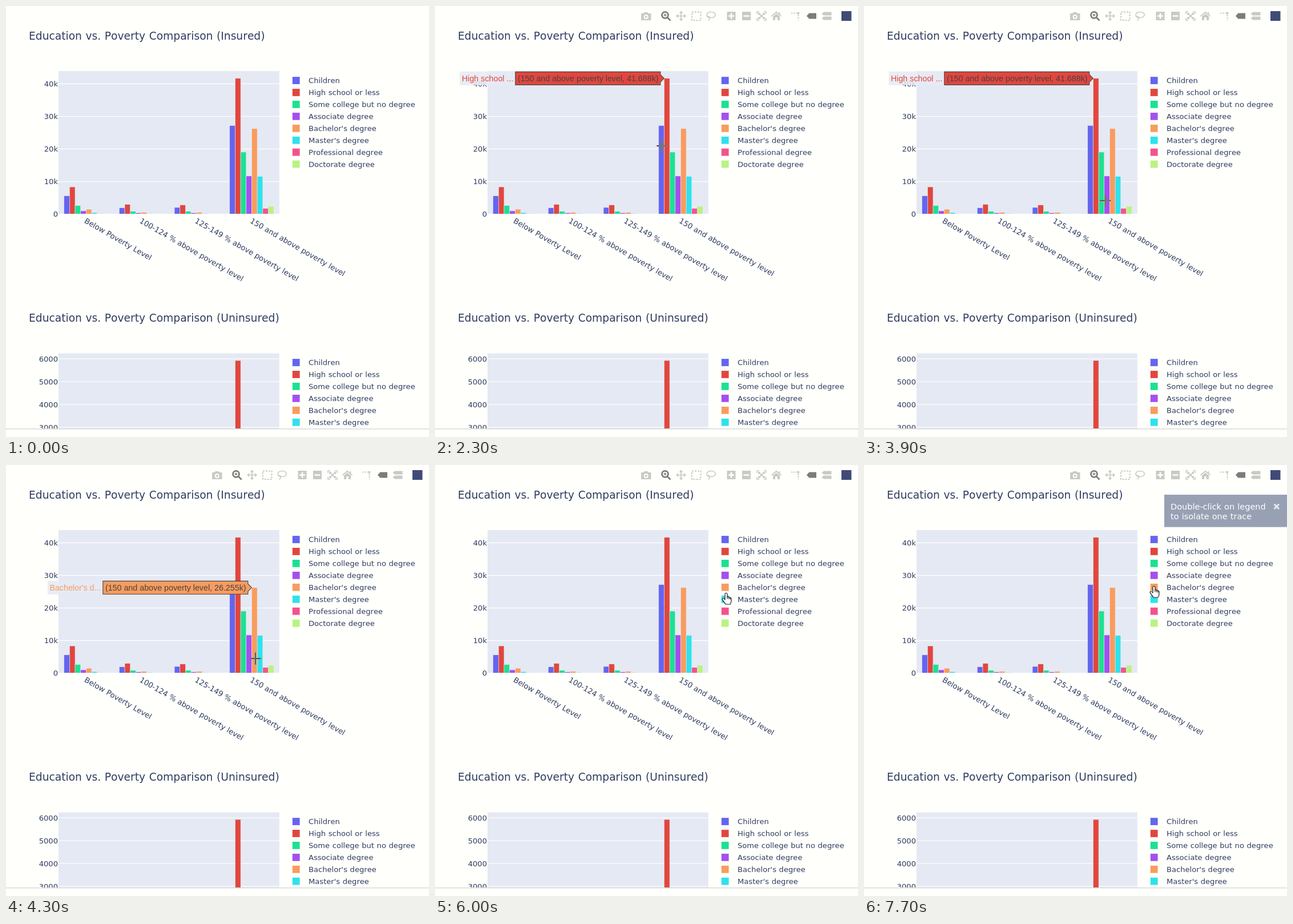
Write an HTML page with a canvas that moves like this. It is 741 px wide and 755 px high and loops after 8000 ms.

```html
<!DOCTYPE html>
<html lang="en">
<head>
<meta charset="utf-8">
<title>Education vs. Poverty Comparison</title>
<style>
  html, body { margin: 0; width: 100%; height: 100%; overflow: hidden; background: #fffffc; }
  canvas { display: block; }
</style>
</head>
<body>
<canvas id="stage" width="741" height="755"></canvas>
<script>
const ctx = document.getElementById('stage').getContext('2d');
const LOOP = 8000, STEP = 100;
const PAGE = '#fffffc', PLOT = '#e5e9f3', INK = '#2f3d60';
const SANS = '"DejaVu Sans", Verdana, sans-serif';
const ARIAL = '"Liberation Sans", Arial, sans-serif';
const SMALL = 13.1;

const traces = [
  { name: 'Children', color: '#6465f0', values: [5600, 1950, 2050, 27209] },
  { name: 'High school or less', color: '#e1463e', values: [8350, 3000, 2800, 41688] },
  { name: 'Some college but no degree', color: '#1ae292', values: [2650, 850, 850, 19050] },
  { name: 'Associate degree', color: '#a350ef', values: [1000, 400, 400, 11700] },
  { name: "Bachelor's degree", color: '#f89c5e', values: [1500, 550, 550, 26255] },
  { name: "Master's degree", color: '#2ee2ec', values: [450, 200, 200, 11600] },
  { name: 'Professional degree', color: '#f4528c', values: [130, 50, 50, 1750] },
  { name: 'Doctorate degree', color: '#b9f382', values: [90, 40, 40, 2400] }
];
const groups = ['Below Poverty Level', '100-124 % above poverty level',
  '125-149 % above poverty level', '150 and above poverty level'];

const LEFT = 92, RIGHT = 478.8, TOP = 114, ZERO = 364.6;
const GROUP = (RIGHT - LEFT) / 4;
const HIDDEN = 5, HIDE_AT = 6500, SHOW_AT = 7400;

// time, x, y of the pointer
const path = [
  [100, 424, 44], [900, 404, 56], [1200, 404, 56], [1500, 404, 66], [1900, 404, 150],
  [2300, 398, 245], [2800, 398, 300], [3200, 398, 343], [3600, 398, 343],
  [4000, 431, 340], [4300, 437, 339], [4600, 437, 339], [4700, 407, 310],
  [4900, 406, 270], [5400, 491, 244], [5800, 510, 226], [6000, 510, 224],
  [7300, 510, 225], [7600, 508, 212]
];
// time, hovered trace (-1 for none)
const hovers = [[0, -1], [1900, 1], [2900, 0], [3800, 1], [4000, 4], [4700, 1], [5000, 4], [5100, -1]];

const clamp = v => Math.max(0, Math.min(1, v));

function rect(x, y, w, h, color) {
  ctx.fillStyle = color;
  ctx.fillRect(x, y, w, h);
}

function text(str, x, y, size, color = INK, align = 'left', family = SANS) {
  ctx.font = `${size}px ${family}`;
  ctx.fontKerning = 'none';
  ctx.wordSpacing = family === SANS ? `${size * 0.034}px` : '0px';
  ctx.textAlign = align;
  ctx.fillStyle = color;
  ctx.fillText(str, x, y);
}

function bar(x, y, w, h, color) {
  rect(x, y, w, h, color);
  ctx.strokeStyle = PLOT;
  ctx.lineWidth = 0.6;
  ctx.strokeRect(x, y, w, h);
}

function gridLine(y, label) {
  rect(LEFT, y - 0.6, RIGHT - LEFT, 1.2, '#fff');
  text(label, 91, y + 4.8, SMALL, INK, 'right');
}

function legend(y, hidden) {
  traces.forEach((tr, i) => {
    const row = y + i * 20.94;
    ctx.globalAlpha = i === hidden ? 0.5 : 1;
    rect(501.8, row - 6.4, 12.8, 12.8, tr.color);
    text(tr.name, 530, row + 4.7, SMALL);
  });
  ctx.globalAlpha = 1;
}

function insuredChart(hidden) {
  text('Education vs. Poverty Comparison (Insured)', 40, 59.3, 18.68);
  rect(LEFT, TOP, RIGHT - LEFT, ZERO - TOP, PLOT);
  for (let k = 0; k < 5; k++) gridLine(ZERO - k * 57.05, k ? k * 10 + 'k' : '0');

  const shown = traces.filter((tr, i) => i !== hidden);
  const w = GROUP * 0.8 / shown.length;
  groups.forEach((name, g) => {
    const x0 = LEFT + GROUP * (g + 0.1);
    shown.forEach((tr, i) => {
      const h = tr.values[g] * 0.005705;
      bar(x0 + i * w, ZERO - h, w, h, tr.color);
    });
    ctx.save();
    ctx.translate(LEFT + GROUP * (g + 0.5) - 4, 379);
    ctx.rotate(Math.PI / 6);
    text(name, 0, 0, SMALL);
    ctx.restore();
  });
  rect(LEFT, ZERO - 0.6, RIGHT - LEFT, 1.4, '#fff');
  legend(130.5, hidden);
}

function uninsuredChart() {
  text('Education vs. Poverty Comparison (Uninsured)', 40, 552.8, 18.68);
  rect(LEFT, 608.5, RIGHT - LEFT, 140, PLOT);
  for (let k = 6; k > 2; k--) gridLine(618 + (6 - k) * 40, k * 1000);
  bar(LEFT + GROUP * 3.2, 621, GROUP * 0.1, 140, traces[1].color);
  legend(624.5, -1);
}

function icon(d, active) {
  ctx.fillStyle = active ? '#7c7c7c' : '#c9c9c7';
  ctx.fill(new Path2D(d), 'evenodd');
}

function iconLine(d, width, active, dash = []) {
  ctx.strokeStyle = active ? '#7c7c7c' : '#c9c9c7';
  ctx.lineWidth = width;
  ctx.setLineDash(dash);
  ctx.stroke(new Path2D(d));
  ctx.setLineDash([]);
}

function modebar(alpha) {
  ctx.globalAlpha = alpha;
  // camera
  icon('M361 13H365L366.5 11H372.5L374 13H378.5V25H361ZM365.7 19a4 4 0 1 0 8 0a4 4 0 1 0-8 0Z');
  icon('M367.6 19a2.1 2.1 0 1 0 4.2 0a2.1 2.1 0 1 0-4.2 0Z');
  // zoom
  iconLine('M397.5 15.8a5.5 5.5 0 1 0 11 0a5.5 5.5 0 1 0-11 0M407.5 20.5L412.5 25.5', 2.8, true);
  iconLine('M400.5 15.8H405.5M403 13.3V18.3', 1.4, true);
  // pan
  iconLine('M424 17.5H438M431 10.5V24.5', 1.7);
  icon('M422 17.5l4-3.5v7ZM440 17.5l-4-3.5v7ZM431 8.5l-3.5 4h7ZM431 26.5l-3.5-4h7Z');
  // box and lasso select
  iconLine('M450 10.5H465.5V25H450Z', 2, false, [3, 2]);
  iconLine('M478 20C474 15 477 10.5 484 10.5C494 10.5 493.5 20.5 483 20.5C478 20.5 477.5 18 480 18.5C483 20 480.5 23 479 25.5', 1.7);
  // zoom in, zoom out
  icon('M511.5 10H526.5V25H511.5ZM517.7 12.5V16.2H514V18.8H517.7V22.5H520.3V18.8H524V16.2H520.3V12.5Z');
  icon('M538 10H553V25H538ZM540.5 16.2V18.8H550.5V16.2Z');
  // autoscale
  iconLine('M564 14V10H568M576 10H580V14M580 21V25H576M568 25H564V21', 1.6);
  iconLine('M567 13L577 22M577 13L567 22', 1.9);
  icon('M566 12h4.5l-4.5 4.5ZM578 12h-4.5l4.5 4.5ZM566 23h4.5l-4.5-4.5ZM578 23h-4.5l4.5-4.5Z');
  // home
  icon('M598 9.5L602.5 13.3V11H604.5V15L607 17.3L606 18.7L598 12L590 18.7L589 17.3ZM598 13.5L604 18.5V25H600V20H596V25H592V18.5Z');
  // spike lines
  iconLine('M624 12.5H635', 2.2, false, [2.5, 2]);
  iconLine('M636.5 15V25', 2.2, false, [2.5, 2]);
  icon('M634.8 10.8h3.4v3.4h-3.4Z');
  // hover modes
  icon('M651 17.5L655.5 12.5H668V22.5H655.5Z', true);
  icon('M677.5 13.7L681 10.5H694.5V16.5H681ZM677.5 21.5L681 18.5H694.5V24.5H681Z');
  rect(712, 9, 17.5, 17, '#3f4b76');
  ctx.globalAlpha = 1;
}

function hoverLabel(i) {
  const tr = traces[i], value = tr.values[3];
  const onRight = i === 0, dir = onRight ? 1 : -1;
  const tip = LEFT + GROUP * (3.1 + 0.1 * (i + (onRight ? 1 : 0)));
  const y = ZERO - value * 0.005705;
  const near = tip + dir * 6.6, far = near + dir * 254;
  const fg = onRight ? '#fff' : '#444';
  const name = tr.name.length > 15 ? tr.name.slice(0, 12) + '...' : tr.name;
  const size = 14.27;

  ctx.font = `${size}px ${ARIAL}`;
  ctx.wordSpacing = '0px';
  const nameW = ctx.measureText(name).width + 7;
  rect(onRight ? far : far - nameW, y - 12, nameW, 24, 'rgba(231,235,245,.86)');
  ctx.beginPath();
  ctx.moveTo(tip, y);
  ctx.lineTo(near, y - 6.6);
  ctx.lineTo(near, y - 11.4);
  ctx.lineTo(far, y - 11.4);
  ctx.lineTo(far, y + 11.4);
  ctx.lineTo(near, y + 11.4);
  ctx.lineTo(near, y + 6.6);
  ctx.closePath();
  ctx.fillStyle = tr.color;
  ctx.fill();
  ctx.strokeStyle = fg;
  ctx.lineWidth = 1.1;
  ctx.stroke();

  const align = onRight ? 'left' : 'right';
  text(`(${groups[3]}, ${(value / 1000).toFixed(3)}k)`, near + dir * 3.3, y + 5, size, fg, align, ARIAL);
  text(name, far + dir * 3.5, y + 5, size, tr.color, align, ARIAL);
}

function notifier(alpha) {
  if (alpha <= 0) return;
  ctx.globalAlpha = alpha;
  rect(526, 52, 215, 56.7, '#98a0b4');
  text('Double-click on legend', 537, 77.5, 14.5, '#fff');
  text('to isolate one trace', 537, 94.8, 14.5, '#fff');
  ctx.strokeStyle = '#e8eaf0';
  ctx.lineWidth = 2.8;
  ctx.stroke(new Path2D('M718.5 68.5L727 77M727 68.5L718.5 77'));
  ctx.globalAlpha = 1;
}

const arrow = new Path2D('M0 0V14.5L3.4 11.4L5.8 17L8.2 16L5.8 10.6H10.3Z');
const hand = new Path2D('M-2 1.5Q0-1 2 1.5V7Q4 5.8 4.8 7.8Q6.6 6.6 7.2 8.8Q9 8 9 10.5V14Q9 17 7 20H-1Q-3 16.5-6 13Q-8 10-5.5 9.5Q-4 9.5-2 12Z');
const fingers = new Path2D('M2 7V10.5M4.8 8V11M7.2 9V11.5');

function pointer(t) {
  if (t < path[0][0]) return;
  let k = 0;
  while (k < path.length - 2 && t >= path[k + 1][0]) k++;
  const [t0, x0, y0] = path[k], [t1, x1, y1] = path[k + 1];
  const p = clamp((t - t0) / (t1 - t0));
  const x = x0 + (x1 - x0) * p, y = y0 + (y1 - y0) * p;

  ctx.save();
  ctx.translate(x, y);
  if (x > LEFT && x < RIGHT && y > TOP && y < ZERO) {
    ctx.globalCompositeOperation = 'difference';
    rect(-9.5, -0.8, 19, 1.6, '#eee');
    rect(-0.8, -10.5, 1.6, 9.7, '#eee');
    rect(-0.8, 0.8, 1.6, 9.7, '#eee');
  } else {
    const isHand = x > 495 && y > 120;
    ctx.fillStyle = '#fff';
    ctx.strokeStyle = '#1c1c24';
    ctx.lineWidth = 1.2;
    ctx.lineJoin = 'round';
    ctx.fill(isHand ? hand : arrow);
    ctx.stroke(isHand ? hand : arrow);
    if (isHand) ctx.stroke(fingers);
  }
  ctx.restore();
}

function draw(t) {
  rect(0, 0, 741, 755, PAGE);
  ctx.save();
  ctx.beginPath();
  ctx.rect(0, 0, 741, 740);
  ctx.clip();
  insuredChart(t >= HIDE_AT && t < SHOW_AT ? HIDDEN : -1);
  uninsuredChart();
  modebar(clamp(t / 300));
  const hovered = hovers.filter(h => t >= h[0]).pop()[1];
  if (hovered >= 0) hoverLabel(hovered);
  notifier(clamp((t - HIDE_AT) / 700));
  pointer(t);
  ctx.restore();
  rect(0, 740, 741, 1.6, '#dcdcda');
}

function frame() {
  const t = performance.now() % LOOP;
  draw(Math.floor(t / STEP) * STEP);
  requestAnimationFrame(frame);
}
frame();
</script>
</body>
</html>
```
